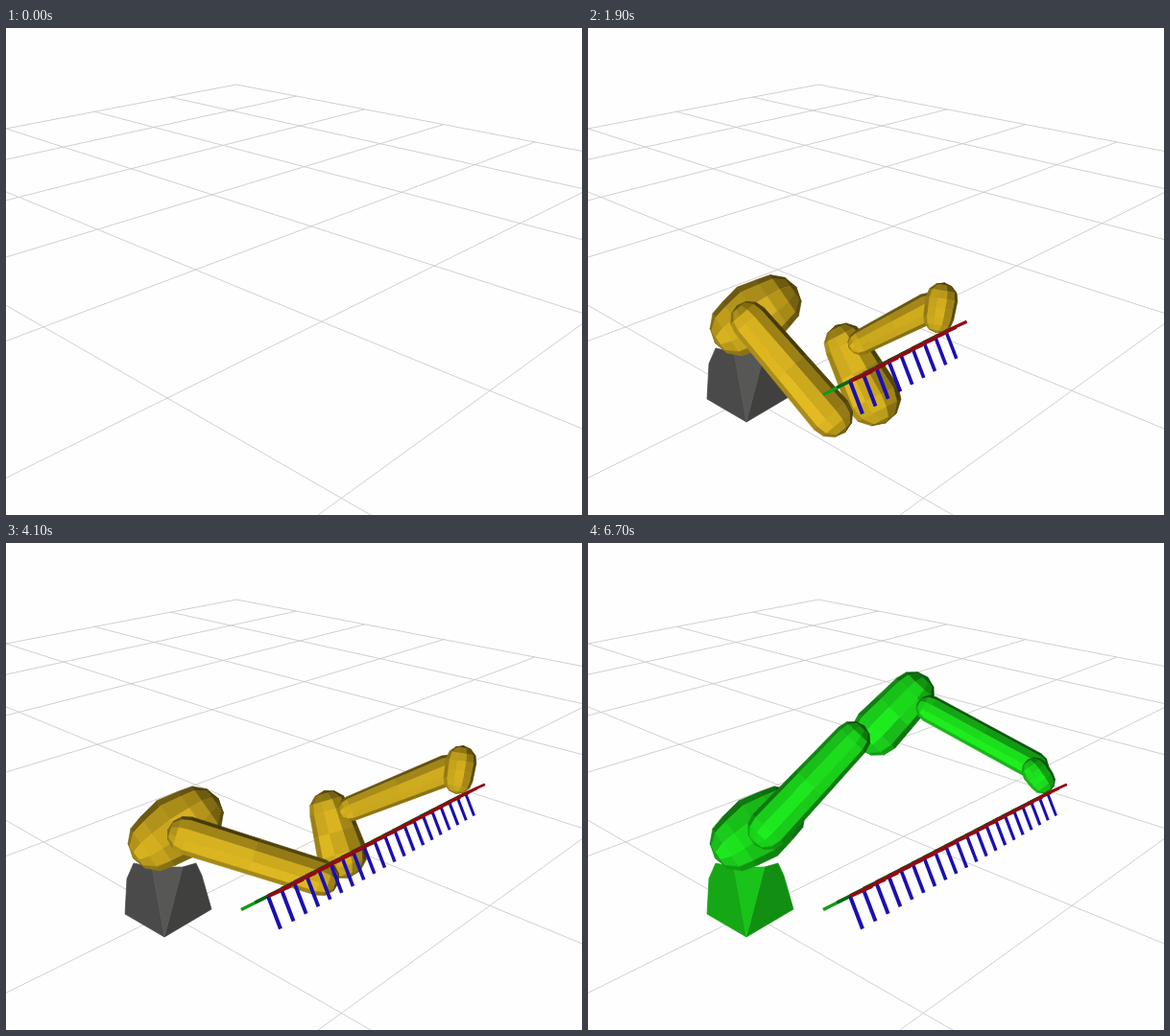
Write an HTML page with a canvas that moves like this. It is 600x508 px and loops after 6.8 s.

```html
<!DOCTYPE html>
<html lang="en">
<head>
<meta charset="utf-8">
<title>Robot arm following a line</title>
<style>
html, body { margin: 0; width: 100%; height: 100%; overflow: hidden; background: #fefefe; }
canvas { display: block; width: 600px; height: 508px; }
</style>
</head>
<body>
<canvas id="stage" width="600" height="508"></canvas>
<script>
const ctx = document.getElementById('stage').getContext('2d');
const LOOP = 6800, STEP = 100, COUNT = 20;
const YELLOW = [232, 192, 34], GREEN = [30, 238, 30], GREY = [106, 106, 105];
const LIGHT = [-.28, .28, .92];
const STRIPS = 5, CAP = 3;

function line(p, q, color, width) {
  ctx.strokeStyle = color;
  ctx.lineWidth = width;
  ctx.beginPath();
  ctx.moveTo(p[0], p[1]);
  ctx.lineTo(q[0], q[1]);
  ctx.stroke();
}

function poly(pts, tint, shade) {
  const s = Math.max(0, Math.min(1, shade));
  ctx.fillStyle = ctx.strokeStyle = `rgb(${tint.map(c => Math.round(c * s)).join()})`;
  ctx.lineWidth = .7;
  ctx.beginPath();
  pts.forEach(p => ctx.lineTo(p[0], p[1]));
  ctx.closePath();
  ctx.fill();
  ctx.stroke();
}

// The floor is a square grid seen in perspective.
function floorPoint(u, v) {
  const w = 1 - .06103 * u - .06681 * v;
  return [(240 + 44.12 * u - 80 * v) / w, (59 + 7.737 * u + 8.318 * v) / w];
}

function drawFloor() {
  for (let u = 0; u <= 6; u++) line(floorPoint(u, 0), floorPoint(u, 6), '#cbcbcb', .9);
  for (let v = 0; v <= 5; v++) line(floorPoint(0, v), floorPoint(8, v), '#cbcbcb', .9);
}

function target(i) {
  const f = i / (1 + .0157 * i);
  return [273 + 14.05 * f, 368.5 - 7.35 * f];
}

function drawAxes(n) {
  const axis = (x, y, shrink, color, width) => {
    for (let i = 0; i < n; i++) {
      const o = target(i), k = 1 / (1 + shrink * i);
      line(o, [o[0] + x * k, o[1] + y * k], color(i), width * (1 - .014 * i));
    }
  };
  axis(-28, 14, .02, i => i ? '#0f6418' : '#149a18', 3.6);
  axis(13, 34, .0235, () => '#1a10b2', 4);
  axis(23, -10.5, .007, () => '#8e0b14', 3.8);
}

// Parabola in x, y and radius through three key poses.
function joint(keys, ...poses) {
  return i => [0, 1, 2].map(c => poses.reduce((sum, p, a) =>
    sum + p[c] * keys.reduce((w, k, b) => b === a ? w : w * (i - k) / (keys[a] - k), 1), 0));
}

const HIGH = [3, 6, 19], LOW = [8, 14, 19];
const pivot = joint(HIGH, [154, 304, 23], [163, 302, 24], [188, 298, 22]);
const high = {
  elbow: joint(HIGH, [164, 220, 25], [180, 212, 26], [275, 205, 19]),
  boxA: joint(HIGH, [207, 221, 26], [223, 208, 26], [301, 196, 26]),
  boxB: joint(HIGH, [230, 185, 26], [248, 175, 26], [338, 157, 23]),
  pivot,
  root: joint(HIGH, [231, 214, 21], [257, 201, 21], [356, 173, 14]),
  wrist: i => offset(target(i), -9, -18, 17 - .15 * i),
  end: w => i => offset(w(i), 1.5 * i - 33, -.55 * i, 14.5),
  lean: [.25, .35]
};
const low = {
  elbow: joint(LOW, [253, 404, 23], [300, 380, 21], [328, 349, 19]),
  boxA: joint(LOW, [268, 330, 22], [308, 308, 21], [337, 279, 21]),
  boxB: joint(LOW, [297, 386, 29], [330, 358, 28], [350, 324, 26]),
  pivot: i => [pivot(i)[0], 305, 20],
  root: i => offset(low.boxA(i), 11 + .6 * i, -2, 13),
  wrist: i => offset(target(i), -6, -24, 17 - .06 * i),
  end: w => i => offset(w(i), -13, 0, 16),
  lean: [-.1, .6]
};

function offset(p, x, y, r) {
  return [p[0] + x, p[1] + y, r];
}

// Small fixed variation so neighbouring facets differ.
function grain(n) {
  const s = Math.sin(n * 12.9898) * 43758.5453;
  return s - Math.floor(s) - .5;
}

// Faceted solid with round ends between two joints.
function capsule(a, b, tint, gain, seed, bulge = 1) {
  const dx = b[0] - a[0], dy = b[1] - a[1], len = Math.hypot(dx, dy) || 1;
  const ax = dx / len, ay = dy / len;
  const rings = [];
  const ring = (c, r, tilt) => rings.push({
    x: c[0] + ax * r * Math.sin(tilt), y: c[1] + ay * r * Math.sin(tilt), r: r * Math.cos(tilt), tilt
  });
  for (let k = -CAP; k <= 0; k++) ring(a, a[2], k / CAP * Math.PI / 2);
  ring([(a[0] + b[0]) / 2, (a[1] + b[1]) / 2], (a[2] + b[2]) / 2 * bulge, 0);
  for (let k = 0; k <= CAP; k++) ring(b, b[2], k / CAP * Math.PI / 2);

  const turn = s => (s / STRIPS - .5) * Math.PI;
  const spot = (g, s) => [g.x - ay * g.r * Math.sin(turn(s)), g.y + ax * g.r * Math.sin(turn(s))];
  for (let k = 1; k < rings.length; k++) {
    const p = rings[k - 1], q = rings[k], tilt = (p.tilt + q.tilt) / 2;
    for (let s = 0; s < STRIPS; s++) {
      const along = Math.sin(tilt), across = Math.cos(tilt) * Math.sin(turn(s + .5));
      const normal = [
        ax * along - ay * across, ay * along + ax * across, Math.cos(tilt) * Math.cos(turn(s + .5))
      ];
      const lit = Math.max(0, normal.reduce((sum, c, n) => sum + c * LIGHT[n], 0));
      const shade = .36 + .62 * lit + .1 * grain(seed * 50 + k * STRIPS + s);
      poly([spot(p, s), spot(q, s), spot(q, s + 1), spot(p, s + 1)], tint, shade * gain);
    }
  }
}

function drawArm(arm, i, tint, gain) {
  const w = arm.wrist(i), [lx, ly] = arm.lean.map(c => c * w[2]);
  const links = [
    [[158, 311, 31], [189 + .4 * i, 290 - .32 * i, 30], 1.15],
    [arm.boxA(i), arm.boxB(i)],
    [arm.pivot(i), arm.elbow(i)],
    [arm.root(i), arm.end(arm.wrist)(i)],
    [offset(w, -lx, -ly, w[2]), offset(w, lx, ly, w[2] * .95)]
  ];
  links.forEach(([a, b, bulge], n) => capsule(a, b, tint, gain, n + 1, bulge));
}

function drawBase(tint) {
  const left = [124, 387], front = [165, 411], right = [214, 382];
  const topLeft = [133, 334], topRight = [198, 334], a = [152, 338], b = [184, 338];
  poly([topLeft, [126, 350], left, front, a], tint, .7);
  poly([b, topRight, [204, 347], right, front], tint, .6);
  poly([a, b, front], tint, .82);
}

function render(ms) {
  const k = Math.floor(ms % LOOP / STEP);
  ctx.fillStyle = '#fefefe';
  ctx.fillRect(0, 0, 600, 508);
  drawFloor();
  if (k < 1) return;

  const highGain = i => .78 + .012 * i;
  if (k < 42) {
    // Each target shows the raised elbow first, then the lowered one.
    const reached = n => Math.floor((n * STEP - 60) / 207);
    const i = reached(k), raised = reached(k - 1) !== i;
    drawBase(GREY);
    drawArm(raised ? high : low, i, YELLOW, raised ? highGain(i) : .96);
    drawAxes(i + 1);
  } else {
    const i = Math.min(COUNT - 1, k - 42);
    drawBase(GREEN);
    drawArm(high, i, GREEN, highGain(i));
    drawAxes(COUNT);
  }
}

const start = performance.now();
function tick() {
  render(performance.now() - start);
  requestAnimationFrame(tick);
}
render(0);
requestAnimationFrame(tick);
</script>
</body>
</html>
```
